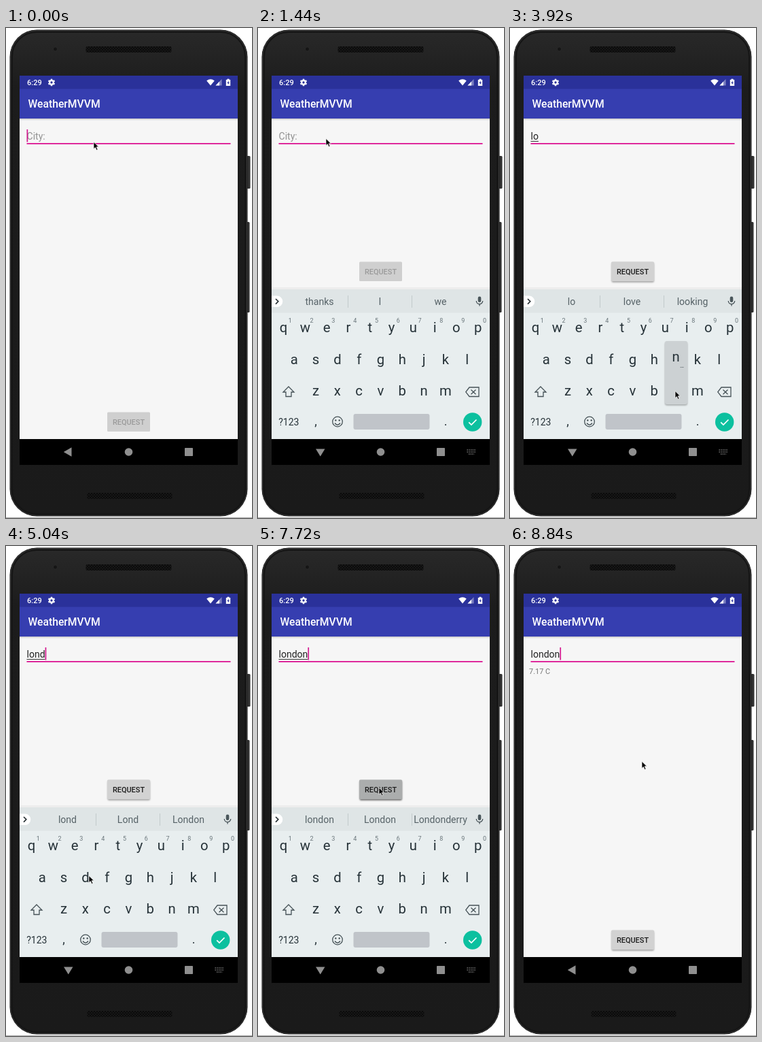
Animation of 362x720 px, one loop 9080 ms. Source, as an HTML page:

```html
<!DOCTYPE html>
<html lang="en">
<head>
<meta charset="utf-8">
<title>Weather app demo</title>
<style>
html, body { margin: 0; width: 100%; height: 100%; overflow: hidden; background: #fff; }
svg { display: block; width: 362px; height: 720px; font-family: Roboto, "Noto Sans", sans-serif; }
text { white-space: pre; }
.mid { text-anchor: middle; }
.bold { font-weight: 500; }
.line { fill: none; stroke: #465257; stroke-width: 1.3; }
</style>
</head>
<body>
<svg viewBox="0 0 362 720">
  <defs>
    <linearGradient id="shell" x2="0" y2="1">
      <stop offset="0" stop-color="#292929"/>
      <stop offset=".12" stop-color="#1c1c1c"/>
      <stop offset="1" stop-color="#1a1a1a"/>
    </linearGradient>
    <linearGradient id="fade" x2="0" y2="1">
      <stop offset="0" stop-color="#000" stop-opacity=".22"/>
      <stop offset="1" stop-color="#000" stop-opacity="0"/>
    </linearGradient>
    <pattern id="mesh" width="4" height="4" patternUnits="userSpaceOnUse">
      <rect width="4" height="4" fill="#0b0b0b"/>
      <path d="M0 0L4 4M4 0L0 4" stroke="#202020" stroke-width=".6"/>
    </pattern>
    <filter id="soft" x="-20%" y="-40%" width="140%" height="190%"><feGaussianBlur stdDeviation="1.1"/></filter>
    <clipPath id="content"><rect x="20" y="132" width="321" height="472"/></clipPath>
  </defs>

  <!-- Phone shell -->
  <path d="M0 719.5H362" stroke="#aaa"/>
  <rect x="354" y="188" width="5.5" height="48" rx="1.5" fill="#333"/>
  <rect x="354" y="285" width="4.5" height="133" rx="1.5" fill="#333"/>
  <rect x="5.5" y="2.5" width="350" height="715" rx="40" fill="#0d0d0d"/>
  <rect x="6.5" y="3.5" width="348" height="713" rx="39" fill="url(#shell)" stroke="#3a3a3a"/>
  <rect x="9" y="6" width="343" height="708" rx="36" fill="none" stroke="#151515" stroke-width="2"/>
  <rect x="117.500" y="27" width="126" height="9" rx="2" fill="url(#mesh)"/>
  <rect x="119.500" y="683" width="125" height="9" rx="2" fill="url(#mesh)"/>
  <circle cx="72.500" cy="31" r="3" fill="#151515" stroke="#303030" stroke-width=".7"/>

  <!-- Status bar and title -->
  <rect x="20" y="132" width="321" height="472" fill="#f6f6f6"/>
  <rect x="20" y="132.500" width="321" height="3.500" fill="url(#fade)"/>
  <rect x="20" y="70" width="321" height="20" fill="#2a319a"/>
  <rect x="20" y="89.500" width="321" height="43.500" fill="#363eb0"/>
  <g fill="#fff">
    <text class="bold" x="31" y="84" font-size="11">6:29</text>
    <g id="gear" transform="translate(67 80)"></g>
    <path d="M295.200 77.500Q301 73 306.800 77.500L301 84.500Z"/>
    <path d="M317.500 75V84.500H308.500Z" opacity=".4"/>
    <path d="M314 78.700V84.500H308.500Z"/>
    <path d="M325.500 74.800H328.500V76H330.200V85H323.800V76H325.500Z"/>
    <path d="M327.600 77.500L325.400 81H326.700V83.500L328.800 80H327.600Z" fill="#2a319a"/>
    <text class="bold" x="32.500" y="117.300" font-size="15.7">WeatherMVVM</text>
  </g>

  <!-- Form -->
  <text id="field" x="30.500" y="163.700" font-size="14.060"></text>
  <rect id="under" x="30.500" y="166" height="1" fill="#333"/>
  <rect x="30.500" y="169" width="300" height="1.800" fill="#dc1593"/>
  <rect id="caret" y="149" width="1.700" height="18.500" fill="#d4188f"/>
  <text id="result" x="28" y="188" font-size="10.940" fill="#777">7.17 C</text>
  <g id="button">
    <rect id="shade" x="149.500" y="1.200" width="62.500" height="29" rx="2" filter="url(#soft)"/>
    <rect id="face" x="149" y="0" width="63" height="28.500" rx="1.500"/>
    <text id="label" class="mid bold" x="180.500" y="18.300" font-size="10.940">REQUEST</text>
  </g>

  <!-- Keyboard -->
  <g clip-path="url(#content)">
    <g id="board">
      <rect x="20" y="381" width="321" height="3" fill="#000" opacity=".035"/>
      <rect x="20" y="384" width="321" height="220" fill="#e8eeef"/>
      <rect x="20" y="384" width="321" height="34.500" fill="#dfe5e6"/>
      <path d="M132.500 393V411M226.500 393V411" stroke="#c3cacc"/>
      <path d="M20 393.500H28A8.300 8.300 0 0 1 28 410.100H20Z" fill="#fff"/>
      <path d="M26 398L29.800 401.800L26 405.600" fill="none" stroke="#20292c" stroke-width="1.600"/>
      <g id="hints" class="mid" font-size="14.060" fill="#566267"></g>
      <rect x="323.700" y="394.500" width="4.600" height="8.600" rx="2.300" fill="#4a565b"/>
      <path class="line" d="M321.300 401A4.700 4.700 0 0 0 330.700 401M326 405.500V408.500"/>
      <g id="keys" class="mid" fill="#263238"></g>
      <path class="line" d="M45 527L53 535H49V541.500H41V535H37Z"/>
      <path class="line" d="M311 528H325V541.500H311L305.800 534.800ZM313.500 531.500L320.500 538.300M320.500 531.500L313.500 538.300"/>
      <circle class="line" cx="117" cy="578.500" r="7.300"/>
      <path class="line" d="M113 580.500Q117 586 121 580.500"/>
      <circle cx="114.300" cy="576.500" r="1.200" fill="#465257"/>
      <circle cx="119.700" cy="576.500" r="1.200" fill="#465257"/>
      <rect x="140.500" y="567" width="112" height="23" rx="3" fill="#c0c4c9"/>
      <circle cx="315.700" cy="579" r="13.700" fill="#0cc09f"/>
      <path d="M310.200 579.300L314 583L321.500 575.500" fill="none" stroke="#fff" stroke-width="1.700"/>
    </g>
  </g>
  <g id="popup">
    <rect x="-16" y="-78.500" width="33" height="93" rx="3" fill="#000" opacity=".3" filter="url(#soft)"/>
    <rect x="-16" y="-80" width="33" height="93" rx="3" fill="#ccd1d3"/>
    <text id="big" class="mid" y="-50" font-size="20.300" fill="#263238"></text>
    <text class="mid" x="9" y="-41" font-size="9" fill="#263238">…</text>
  </g>

  <!-- Navigation bar -->
  <rect x="20" y="604" width="321" height="38" fill="#000"/>
  <g fill="#8f8f8f">
    <path id="back"/>
    <circle cx="180.500" cy="623" r="5.800"/>
    <rect x="263" y="617" width="12" height="12" rx=".7"/>
    <path id="switch" fill="none" stroke="#777" stroke-width="1.500" stroke-dasharray="1.500 1.200"
      d="M307.500 620H321M307.500 623H321M310 626H318.500"/>
  </g>
  <path id="mouse" d="M0 0V10.200L2.400 8L4.200 12L6 11.200L4.200 7.300H7.400Z" fill="#000" stroke="#fff" stroke-width=".7"/>
</svg>
<script>
const LOOP = 9080, STEP = 40, PITCH = 31.8;
const $ = id => document.getElementById(id);
const put = (id, attrs) => { for (const k in attrs) $(id).setAttribute(k, attrs[k]); };
const show = (id, on) => put(id, { visibility: on ? 'visible' : 'hidden' });
const move = (id, x, y) => put(id, { transform: `translate(${x} ${y})` });
const between = (t, a, b) => t >= a && t < b;

function addText(parent, str, x, y, attrs = {}) {
  const el = document.createElementNS('http://www.w3.org/2000/svg', 'text');
  el.textContent = str;
  for (const [k, v] of Object.entries({ x, y, ...attrs })) el.setAttribute(k, v);
  return $(parent).appendChild(el);
}

// Keyboard layout
const keyPos = {};
[['qwertyuiop', 37.5, 447], ['asdfghjkl', 53.3, 494], ['zxcvbnm', 85, 540]].forEach(([row, x0, y]) => {
  [...row].forEach((ch, i) => {
    const x = x0 + i * PITCH;
    keyPos[ch] = { x, y };
    addText('keys', ch, x, y, { 'font-size': 20.3 });
  });
});
[...'1234567890'].forEach((d, i) =>
  addText('keys', d, 47.3 + i * PITCH, 433, { 'font-size': 9, fill: '#69757a' }));
addText('keys', '?123', 45.3, 584, { 'font-size': 14.06 });
addText('keys', ',', 85, 584, { 'font-size': 18 });
addText('keys', '.', 276, 584, { 'font-size': 18 });
const hints = [90.5, 179.5, 268.5].map(x => addText('hints', '', x, 406.7));

$('gear').innerHTML = '<circle r="2.8" fill="none" stroke="#fff" stroke-width="2.300"/>' +
  [0, 60, 120].map(a => `<path d="M0 -5.200V-3M0 3V5.200" stroke="#fff" stroke-width="2.400" transform="rotate(${a})"/>`).join('');

// [time, text, suggestions]
const typed = [
  [0, '', 'thanks I we'],
  [2840, 'l', 'l love look'],
  [3240, 'lo', 'lo love looking'],
  [4040, 'lon', 'lon long London'],
  [4960, 'lond', 'lond Lond London'],
  [5800, 'londo', 'londo Londo London'],
  [6720, 'london', 'london London Londonderry']
];
// [key, down, up]
const presses = [
  ['l', 2680, 2840], ['o', 3120, 3240], ['n', 3920, 4040],
  ['d', 4840, 4960], ['o', 5520, 5680], ['n', 6480, 6640]
];
// Times at which the caret flips, starting visible
const blinks = [560, 1040, 1240, 1480, 2000, 2520, 3760, 4040, 4560, 4960, 5480, 5800, 6320, 6720, 7240, 7720, 8320, 8840];
// [time, x, y]
const path = [
  [560, 129, 167.5], [1040, 100, 162.5], [1560, 100, 162.5], [2100, 268, 526], [2480, 302, 484.5],
  [2880, 302, 484.5], [3080, 290, 441], [3400, 290, 441], [3760, 243, 533.5],
  [4120, 243, 533.5], [4680, 116, 486], [5000, 116, 486], [5360, 290, 441],
  [5840, 290, 441], [6280, 243, 533.5], [6760, 243, 533.5], [7440, 178, 355],
  [7920, 178, 355], [8320, 194, 316.5]
];

const ease = p => p * p * (3 - 2 * p);
const ramp = (t, a, b) => ease(Math.min(1, Math.max(0, (t - a) / (b - a))));

function mouseAt(t) {
  let [, x, y] = path[0];
  for (let i = 1; i < path.length; i++) {
    const p = ramp(t, path[i - 1][0], path[i][0]);
    x += (path[i][1] - path[i - 1][1]) * p;
    y += (path[i][2] - path[i - 1][2]) * p;
  }
  return [x, y];
}

function drawField(t) {
  const [, text, words] = typed.filter(s => s[0] <= t).pop();
  $('field').textContent = text || 'City:';
  put('field', { fill: text ? '#222' : '#929292' });
  const width = text ? $('field').getComputedTextLength() : 0;
  put('under', { width: t < 8000 ? width : 0 });
  put('caret', { x: 30.5 + width });
  show('caret', blinks.filter(b => b <= t).length % 2 === 0);
  words.split(' ').forEach((w, i) => { hints[i].textContent = w; });
  return text;
}

function drawButton(enabled, pressed, raised) {
  move('button', 0, raised ? 343.5 : 564.5);
  put('face', { fill: pressed ? '#abadad' : enabled ? '#d2d2d2' : '#cfcfcf' });
  put('label', { fill: enabled ? '#1c1c1c' : '#9a9a9a' });
  put('shade', { opacity: pressed ? .55 : enabled ? .33 : 0 });
}

function draw(t) {
  const text = drawField(t);
  const open = between(t, 1240, 8040);
  drawButton(text !== '', between(t, 7680, 7880), open);
  show('result', t >= 8240);

  const shift = 1 - ramp(t, 1200, 1400) + ramp(t, 7960, 8160);
  move('board', 0, 224 * shift);
  show('switch', open);
  put('back', { d: open ? 'M85 618.500H98.500L91.750 629.500Z' : 'M84.800 623L96.500 616.300V629.700Z' });

  const press = presses.find(p => between(t, p[1], p[2]));
  show('popup', press);
  if (press) {
    const { x, y } = keyPos[press[0]];
    move('popup', x, y);
    $('big').textContent = press[0];
  }
  move('mouse', ...mouseAt(t));
}

function tick() {
  draw(Math.floor(performance.now() % LOOP / STEP) * STEP);
  requestAnimationFrame(tick);
}
tick();
</script>
</body>
</html>
```
